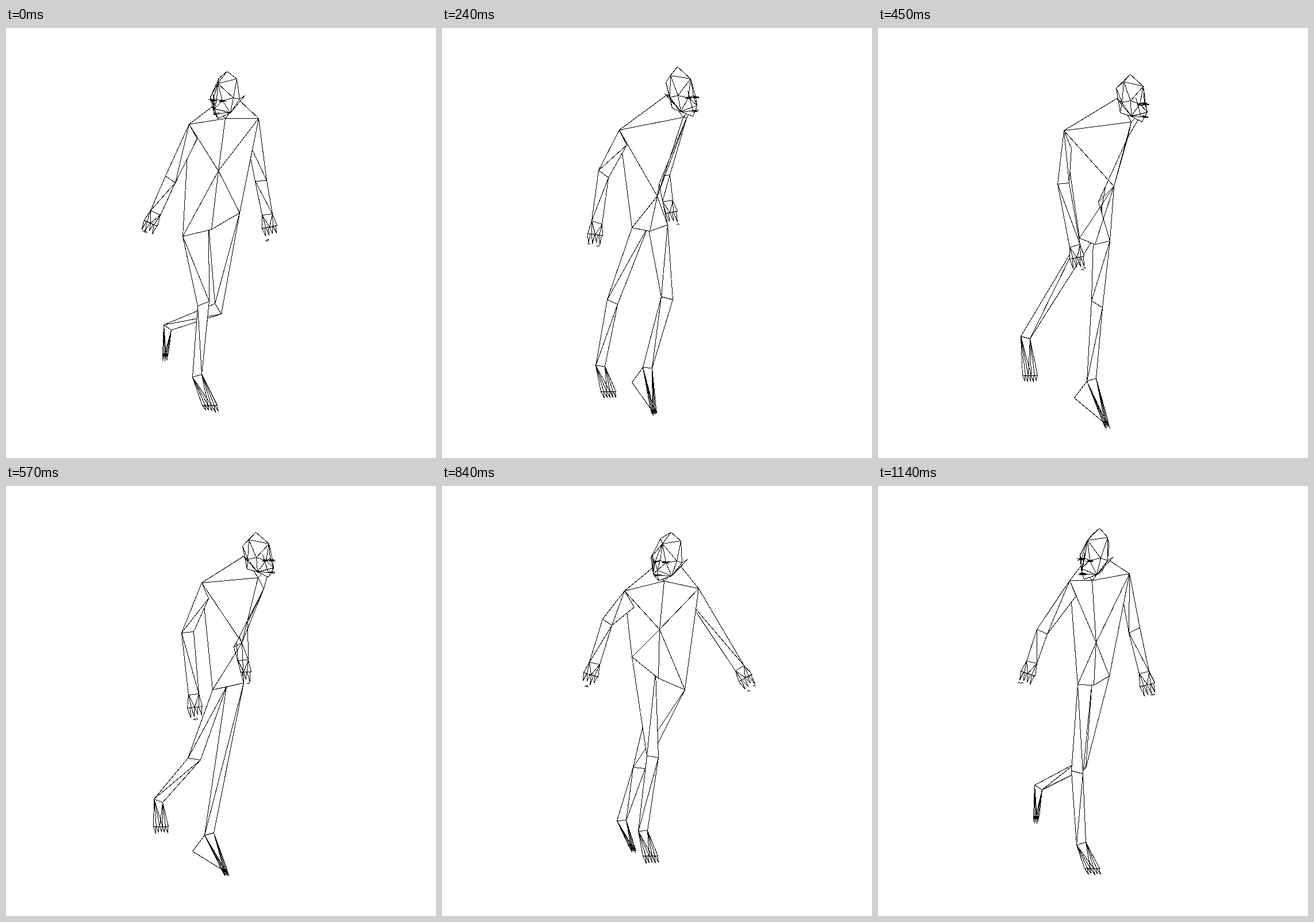
An HTML page for the animation above (1200 ms loop, 748 px wide and 748 px high).

```html
<!DOCTYPE html>
<html lang="en">
<head>
<meta charset="utf-8">
<title>Wireframe walk</title>
<style>
  html, body { margin: 0; width: 100%; height: 100%; overflow: hidden; background: #fff; }
  svg { display: block; width: 100vw; height: 100vh; }
  path { fill: #fff; stroke: #000; stroke-width: 1; stroke-linejoin: bevel; shape-rendering: crispEdges; }
</style>
</head>
<body>
<svg viewBox="0 0 748 748"><g id="body" transform="translate(.5 .5)"></g></svg>
<script>
const FRAMES = 39, STEP = 30, LOOP = 1200;

// Way of each joint through the key poses; A is the near side, B the far side.
const poseAt = [0, 8, 15, 23, 28, 32, 38];
const ways = {
  top: '384,75 409,67 438,80 422,79 398,80 382,88 385,73',
  chin: '381,157 419,155 440,163 427,155 386,165 369,172 372,164',
  shoulderA: '318,167 308,177 323,178 351,160 317,182 326,176 333,164',
  shoulderB: '439,157 425,156 434,190 459,164 446,178 448,162 437,152',
  elbowA: '288,258 280,256 322,265 300,246 288,235 297,222 285,252',
  elbowB: '442,262 385,262 390,255 434,232 480,248 470,264 446,254',
  wristA: '260,320 269,338 342,378 295,338 265,308 258,304 267,306',
  wristB: '454,325 392,300 380,310 456,296 517,315 497,337 463,325',
  hipA: '307,362 330,347 350,365 361,335 330,297 354,300 347,345',
  hipB: '406,321 392,342 403,370 422,315 422,354 418,325 402,330',
  kneeA: '343,482 295,480 298,471 355,483 366,468 368,470 346,492',
  kneeB: '368,489 391,467 381,478 364,495 341,495 351,462 355,482',
  ankleA: '332,605 275,588 256,537 286,570 349,600 378,616 353,621',
  ankleB: '280,521 357,592 371,611 330,595 312,583 290,565 278,525',
  toeA: '358,665 292,642 265,614 291,601 365,653 411,666 376,674',
  toeB: '276,576 369,671 398,693 359,651 333,634 304,616 274,584'
};
for (const name in ways) ways[name] = ways[name].split(' ').map(p => p.split(',').map(Number));

const add = (a, b, k = 1) => [a[0] + k * b[0], a[1] + k * b[1]];
const sub = (a, b) => add(a, b, -1);
const mix = (a, b, k) => add(a, sub(b, a), k);
const unit = v => { const l = Math.hypot(...v) || 1; return [v[0] / l, v[1] / l]; };
const side = v => [-v[1], v[0]];

let seed = 1;
function rand() {
  seed = (seed * 16807) % 2147483647;
  return seed / 2147483647;
}
const spread = k => (rand() - 0.5) * 2 * k;

const point = p => p.map(Math.round).join();
const line = (...pts) => 'M' + pts.map(point).join(' ');
const shape = (...pts) => line(...pts) + 'Z';

// Smooth cyclic curve through the key poses.
function jointsAt(frame) {
  const n = poseAt.length;
  let k = n - 1;
  while (poseAt[k] > frame) k--;
  const ids = [-1, 0, 1, 2].map(d => (k + d + n) % n);
  const [t0, t1, t2, t3] = ids.map((id, i) => poseAt[id] + FRAMES * Math.floor((k + i - 1) / n));
  const h = t2 - t1, u = (frame - t1) / h, v = 1 - u, joints = {};
  for (const name in ways) {
    const [p0, p1, p2, p3] = ids.map(id => ways[name][id]);
    joints[name] = [0, 1].map(c => {
      const m1 = (p2[c] - p0[c]) / (t2 - t0), m2 = (p3[c] - p1[c]) / (t3 - t1);
      return v * v * (1 + 2 * u) * p1[c] + u * u * (3 - 2 * u) * p2[c] + h * u * v * (v * m1 - u * m2);
    });
  }
  return joints;
}

// Turn of the body: below zero to the left, above zero to the right.
const turnAt = frame => 0.9 * Math.tanh(1.6 * Math.cos((frame - 14.5) / FRAMES * 2 * Math.PI) + 0.45);

// Triangles between rungs, each with a random diagonal.
function strip(rungs) {
  let d = '';
  for (let i = 1; i < rungs.length; i++) {
    const [a, b] = rungs[i - 1], [c, e] = rungs[i];
    d += rand() < 0.5 ? shape(a, b, c) + shape(b, e, c) : shape(a, b, e) + shape(a, e, c);
  }
  return d;
}

// Rungs of a limb: a given root, then a rung across each further joint.
function limbRungs(root, joints, widths) {
  const chain = [mix(...root, 0.5), ...joints];
  const rungs = [root];
  widths.forEach((w, i) => {
    const before = unit(sub(chain[i + 1], chain[i])), after = unit(sub(chain[i + 2], chain[i + 1]));
    const bend = Math.abs(before[0] * after[1] - before[1] * after[0]);
    const last = i === widths.length - 1;
    if (!last && bend < 0.12 && rand() < 0.4) return;
    const dir = unit(add(before, after)), across = side(dir), slip = last ? 2 : 8;
    rungs.push([w, -w].map(k => add(add(chain[i + 1], across, k), dir, spread(slip))));
  });
  return rungs;
}

// Palm or sole as a fan, ending in pointed digits.
function fan([left, right], base, across, count, tip) {
  const knuckles = Array.from({ length: count + 1 }, (_, i) =>
    add(base, across, 1 - 2 * i / count));
  let d = shape(left, knuckles[count >> 1], right);
  for (let i = 0; i < count; i++) {
    const a = knuckles[i], b = knuckles[i + 1];
    d += shape(i < count / 2 ? left : right, a, b);
    d += shape(a, add(mix(a, b, 0.5), tip, 0.8 + 0.4 * rand()), mix(a, b, 0.75));
  }
  return d;
}

function arm(root, elbow, wrist) {
  const dir = unit(sub(wrist, elbow)), across = side(dir);
  const rungs = limbRungs(root, [elbow, wrist, add(wrist, dir, 20)], [10, 9]);
  const base = add(wrist, dir, 21), end = rungs[rungs.length - 1];
  let d = strip(rungs) + fan(end, base, add([0, 0], across, 13), 4, add([0, 0], dir, 15));
  // Loose chips beyond the fingers
  for (let i = 0; i < 2; i++) {
    const p = add(add(base, dir, 18 + 6 * rand()), across, spread(12));
    d += line(p, add(p, [3, -1]), add(p, [4, 2]));
  }
  return d;
}

function leg(root, knee, ankle, toe, width, heel) {
  const rungs = limbRungs(root, [knee, ankle, toe], [10, 8]);
  const dir = unit(sub(toe, ankle)), base = add(toe, dir, -10);
  const end = rungs[rungs.length - 1];
  let d = strip(rungs);
  if (heel > 0) d += shape(end[0], add(end[0], [-25, 34], heel), add(base, [-width, 0]));
  return d + fan(end, base, [-width, 0], 5, add([0, 0], dir, 11));
}

function torso(j, turn, neckA, neckB) {
  const { shoulderA: sA, shoulderB: sB, hipA, hipB, chin } = j;
  const low = add(mix(hipA, hipB, 0.5), [0, 8]);
  const core = add(mix(chin, low, 0.4 + 0.3 * rand()), [spread(8), 0]);
  const waist = add(mix(sB, hipB, 0.62), [-36, 0], Math.max(0, turn));
  const rim = [sA, chin, sB];
  if (turn > 0) rim.push(waist);
  rim.push(hipB);
  if (rand() < 0.6) rim.push(low);
  rim.push(hipA);
  let d = shape(sA, neckA, chin) + shape(sB, neckB, chin);
  rim.forEach((p, i) => d += shape(core, p, rim[(i + 1) % rim.length]));
  return d;
}

// Half a head: right, up and forward; the other half is mirrored.
const skull = {
  crown: [0, 1, 0], front: [0, 0.74, 0.9], brow: [0, 0.4, 0.95], nose: [0, 0.2, 1.15],
  lip: [0, 0.1, 0.95], chin: [0, 0, 0.75], back: [0, 0.72, -1], nape: [0, 0.2, -0.75],
  dome: [0.7, 0.85, -0.1], temple: [0.9, 0.44, 0.45], ear: [1, 0.42, -0.1],
  lobe: [1.25, 0.5, -0.3], jaw: [0.65, 0.12, 0.35], eye: [0.38, 0.37, 0.85]
};
const faces = ['crown front dome', 'front temple dome', 'front brow eye', 'front eye temple',
  'brow nose eye', 'eye nose jaw', 'eye jaw temple', 'nose lip jaw', 'lip chin jaw',
  'temple ear dome', 'temple jaw ear', 'dome ear back', 'crown dome back', 'ear nape back',
  'ear jaw nape', 'ear lobe jaw'].map(f => f.split(' '));

function makeHead({ chin, top }, turn) {
  const axis = sub(top, chin), across = side(unit(axis));
  const s = Math.sin(1.25 * turn), c = Math.cos(1.25 * turn);
  const rotate = ([x, y, z], m = 1) => [m * x * c + z * s, y, z * c - m * x * s];
  const flat = p => add(add(chin, axis, p[1]), across, p[0] * 28);

  function visible([a, b, e]) {
    const u = b.map((v, i) => v - a[i]), w = e.map((v, i) => v - a[i]);
    const n = [u[1] * w[2] - u[2] * w[1], u[2] * w[0] - u[0] * w[2], u[0] * w[1] - u[1] * w[0]];
    const out = n.reduce((sum, v, i) => sum + v * (a[i] + b[i] + e[i] - (i === 1 ? 1.35 : 0)), 0);
    return n[2] * out > 0;
  }
  function scribble(p, w, h) {
    const pts = Array.from({ length: 8 }, (_, i) =>
      add(flat(p), [(i % 2 ? w : -w) + spread(2), spread(h)]));
    return line(...pts);
  }
  function draw() {
    let d = '';
    for (const m of [-1, 1]) {
      for (const f of faces) {
        const tri = f.map(name => rotate(skull[name], m));
        if (visible(tri)) d += shape(...tri.map(flat));
      }
      const eye = rotate(skull.eye, m);
      if (eye[2] > 0) d += scribble(eye, 5, 2);
    }
    return d + scribble(rotate(skull.lip), 5, 2);
  }
  return { flat, draw };
}

function figure(frame) {
  seed = 7919 * (frame + 3);
  for (let i = 0; i < 5; i++) rand();
  const j = jointsAt(frame), turn = turnAt(frame), head = makeHead(j, turn);
  const neck = m => head.flat([0.8 * m, 0.25 + 0.3 * Math.max(0, m * -turn), 0]);
  const crotch = mix(j.hipA, j.hipB, 0.45);
  const pitA = mix(j.shoulderA, j.hipB, 0.16), pitB = mix(j.shoulderB, j.hipA, 0.16);
  return [
    arm([pitB, j.shoulderB], j.elbowB, j.wristB),
    leg([crotch, j.hipB], j.kneeB, j.ankleB, j.toeB, 5, turn),
    leg([j.hipA, crotch], j.kneeA, j.ankleA, j.toeA, 13, 0),
    torso(j, turn, neck(-1), neck(1)),
    arm([j.shoulderA, pitA], j.elbowA, j.wristA),
    head.draw()
  ];
}

// Painted from back to front
const body = document.getElementById('body');
const layers = Array.from({ length: 6 }, () =>
  body.appendChild(document.createElementNS('http://www.w3.org/2000/svg', 'path')));
const start = performance.now();
let shown = -1;

function draw(now) {
  const ms = Math.max(0, now - start) % LOOP;
  const frame = Math.min(FRAMES - 1, Math.floor(ms / STEP));
  if (frame !== shown) {
    shown = frame;
    figure(frame).forEach((d, i) => layers[i].setAttribute('d', d));
  }
  requestAnimationFrame(draw);
}
draw(start);
</script>
</body>
</html>
```
